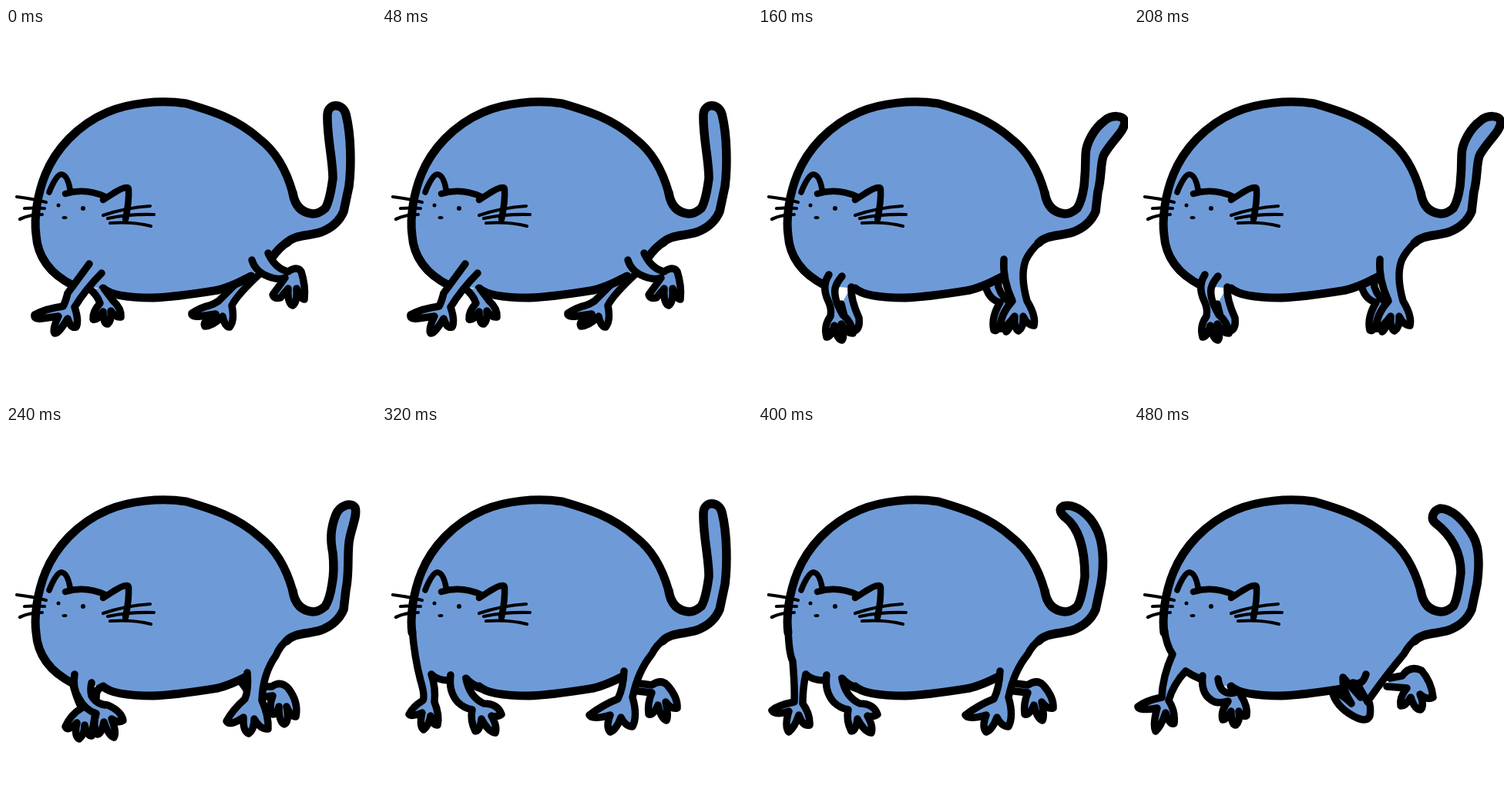
An HTML page for the animation above (560 ms loop, 480 by 480 pixels).

```html
<!DOCTYPE html>
<html lang="en">
<head>
<meta charset="utf-8">
<title>Walking round cat</title>
<style>
  html, body { margin: 0; width: 100%; height: 100%; overflow: hidden; background: #fff; }
  svg { display: block; width: 100vw; height: 100vh; }
</style>
</head>
<body>
<svg id="stage" viewBox="0 0 480 480" fill="none" stroke="#000" stroke-linecap="round" stroke-linejoin="round">
  <g id="behind" fill="#6e9bd8" stroke-width="9.5"></g>
  <path id="bodyFill" fill="#6e9bd8" stroke="none"/>
  <path id="bodyLine" stroke-width="11"/>
  <path id="tail" fill="#6e9bd8" stroke-width="11.5"/>
  <g id="front" fill="#6e9bd8" stroke-width="9.5"></g>
  <g id="face">
    <path stroke-width="7.5" d="M56,213Q66,188 73,190Q80,192 83,209"/>
    <path stroke-width="8.5" d="M77,215Q103,207 129,219M126,223L140,214Q158,203 159,209Q160,225 155,248"/>
    <path stroke-width="4.2" d="M14,219Q32,221 52,226M24,234Q38,233 50,234M18,248Q30,242 47,242
      M126,243Q155,233 187,231M132,247Q160,241 192,242M135,253Q165,251 188,257"/>
    <g fill="#000" stroke="none">
      <circle cx="68" cy="230" r="2.5"/>
      <circle cx="100" cy="234" r="3"/>
      <ellipse cx="76" cy="246" rx="3.5" ry="2.1"/>
    </g>
  </g>
</svg>
<script>
const FRAME_MS = 80;
const byId = id => document.getElementById(id);

// Body pieces that never move
const back = 'M372,214C362,178 346,157 329,144C299,117 265,107 234,98C200,93 160,97 132,109C92,126 64,158 51,190C41,215 36,245 39,268';
const chest = 'C41,298 59,320 87,334';
const bellyCurve = 'C136,347 160,350 190,350C220,349 250,344 275,340C295,335 306,328 318,322';
const belly = 'M126,338' + bellyCurve;
const rump = 'M366,277Q355,284 345,298';
const bellyStart = 'M109,328Q116,336 128,340';

// Tail tips, between the fixed outer and inner base
const tails = {
  up: 'L445,205C448,180 448,140 441,112C437,97 418,97 417,112C416,140 424,170 424,195',
  right: 'L441,212C446,195 443,172 448,150C453,135 460,125 460,113C457,101 444,106 438,114C428,125 425,145 425,160C426,180 424,195 423,205',
  farRight: 'L441,212C446,195 444,172 449,164C460,145 475,135 476,122C474,112 458,113 450,120C436,130 425,150 425,165C425,185 424,195 423,205',
  tilted: 'L441,212C446,190 442,160 446,145C449,130 456,115 453,106C448,98 433,103 428,115C420,135 421,150 424,165C426,185 425,195 423,205',
  left: 'L445,205C450,175 447,150 440,135C430,113 410,100 396,104C389,108 393,114 399,119C416,132 424,160 424,195',
  farLeft: 'L445,205C449,175 447,155 440,143C428,122 412,107 397,107C387,110 385,120 390,125C408,139 424,160 424,190'
};
const tailPath = tip => `M364,279C374,268 392,270 408,265Q430,257 438,238${tip}Q420,225 414,234Q406,241 398,241Q376,239 372,214`;

// Legs shared by the planted poses
const plantedFront = 'M89,323Q86,344 98,358Q106,366 117,368Q114,382 121,396Q127,396 129,380Q138,397 147,398Q150,390 142,376Q150,378 155,374Q150,360 132,360Q114,352 109,328';
const plantedHind = 'M314,318Q313,340 306,354Q286,362 269,375Q272,382 296,375Q290,390 296,397Q304,394 310,378Q316,390 325,390Q332,376 325,352Q332,318 350,296Q356,284 366,277';
const plantedFarHind = 'M332,344L350,346Q344,360 346,374Q352,376 358,362Q362,380 369,382Q372,376 368,358Q376,368 383,366Q384,352 370,336Q362,328 350,336L334,334';

const poses = [
  {
    tail: tails.up, edge: chest + rump,
    behind: ['M304,326L276,354Q270,358 264,360Q254,362 241,370Q240,375 252,374L272,371Q254,381 258,387Q268,387 281,374Q284,388 290,388Q297,380 293,360Q300,346 328,320'],
    front: [
      'M108,338Q118,346 122,357Q112,368 113,378Q118,380 126,368Q126,384 132,384Q137,380 136,367Q142,376 149,375Q150,364 139,354L127,338',
      'M108,306L80,344Q77,356 74,361Q52,364 37,372Q36,378 46,377L68,374Q60,390 63,396Q68,397 80,377Q84,390 91,388Q95,380 89,362Q104,338 124,318',
      'M319,301Q324,318 345,324Q355,327 362,324Q352,338 346,346Q348,352 356,350L366,338Q365,358 372,360Q378,356 377,338Q382,352 387,352Q389,335 383,316Q378,308 366,316Q349,312 340,292'
    ]
  },
  {
    tail: tails.right, edge: chest + rump,
    behind: ['M304,326Q296,345 295,356Q278,364 266,376Q267,384 286,378Q284,394 290,396Q298,390 300,377Q308,390 318,390Q321,382 309,358Q311,342 328,318'],
    front: [
      'M102,344L118,358Q106,368 107,377Q113,381 121,368Q120,381 126,380Q132,376 132,366Q138,377 145,374Q147,362 140,351Q134,346 130,350Q123,344 124,336',
      'M104,309Q78,332 84,358Q66,372 58,388Q61,395 74,382Q73,398 79,400Q86,396 85,380Q93,396 100,394Q103,380 97,361Q95,344 118,321',
      'M320,302Q330,324 350,334Q338,346 335,364Q340,369 353,352Q354,368 363,370Q367,366 365,352Q372,367 379,368Q381,345 372,326Q346,315 340,291'
    ]
  },
  {
    tail: tails.farRight, edge: chest,
    behind: ['M294,330Q298,352 314,356Q302,376 306,392Q311,395 317,378L322,394Q328,392 332,360Q316,350 312,336Q310,328 318,322'],
    front: [
      'M108,358L112,374L122,394Q133,392 131,376Q120,352 121,336',
      'M92,320Q82,335 91,354Q96,364 94,374Q85,386 89,401Q95,401 99,386Q102,404 109,405Q113,400 108,384Q116,397 123,396Q122,382 110,372Q98,352 100,338Q102,330 109,322',
      'M319,300Q317,326 330,354Q314,372 314,390Q320,391 333,374Q332,390 338,393Q345,388 344,374Q350,386 358,386Q361,374 349,354Q340,322 347,302Q352,290 366,277'
    ]
  },
  {
    tail: tails.tilted, edge: chest,
    behind: [
      'M302,328L312,342',
      'M332,352L346,350Q340,366 346,374Q352,374 354,364Q354,384 361,387Q368,384 364,364Q370,378 376,377Q380,358 366,340Q356,330 345,338L334,338'
    ],
    front: [
      'M126,338Q116,340 117,354',
      'M86,332Q91,352 98,366Q84,374 77,390Q80,397 92,385Q88,402 95,406Q102,400 102,388Q105,402 111,402L116,372',
      'M89,322Q86,340 94,352Q102,368 117,373Q112,388 118,400Q124,400 127,384Q133,402 140,404Q144,398 137,380Q146,386 152,382Q150,370 132,362Q118,362 111,350Q109,342 111,333',
      'M313,320Q315,342 310,354Q294,368 286,383Q290,390 308,378Q307,396 315,399Q322,394 322,380Q330,394 340,393Q341,376 332,356Q333,322 350,298Q356,284 366,277'
    ]
  },
  {
    tail: tails.up, edge: bellyStart,
    behind: [plantedFarHind],
    front: [
      'M39,262Q42,300 50,330Q56,350 53,356Q40,364 35,374Q38,378 52,372Q48,390 54,394Q61,388 63,376Q66,388 72,388Q75,375 68,358Q70,340 64,322Q72,330 86,330',
      plantedFront, plantedHind
    ]
  },
  {
    tail: tails.left, edge: bellyStart,
    behind: [plantedFarHind],
    front: [
      'M39,262Q40,295 45,305Q48,340 47,358Q26,362 18,369Q22,376 40,370Q34,390 40,397Q48,390 53,375Q58,390 67,388Q68,374 58,360Q58,340 62,322Q70,330 86,330',
      plantedFront, plantedHind
    ]
  },
  {
    tail: tails.farLeft, edge: '',
    behind: ['M328,338L354,340Q344,352 346,363Q352,364 359,352Q364,368 372,368Q377,362 371,348Q380,356 388,352Q386,332 373,317Q358,310 348,324L332,327'],
    front: [
      'M39,262Q42,285 50,296Q37,325 36,352Q16,356 5,364Q6,370 30,366Q24,388 28,396Q35,390 41,372Q46,388 52,386Q54,370 45,356Q51,335 67,318Q76,324 86,328',
      'M89,324Q86,350 105,358Q114,360 122,357Q112,370 115,381Q120,382 126,370Q126,388 132,388Q138,383 136,370Q140,378 146,376Q148,364 139,350Q136,342 130,346Q112,350 109,328',
      'M301,322Q296,338 284,333L294,352L271,326Q270,342 282,360Q268,346 257,344Q262,364 284,376Q302,386 306,376Q308,364 304,356Q328,322 350,296Q358,282 366,277',
      'M291,337L303,358'
    ]
  }
];

const toPaths = list => list.map(d => `<path d="${d}"/>`).join('');

function drawPose({ tail, edge, behind, front }) {
  byId('behind').innerHTML = toPaths(behind);
  byId('front').innerHTML = toPaths(front);
  byId('tail').setAttribute('d', tailPath(tail));
  byId('bodyLine').setAttribute('d', back + edge + belly);
}

byId('bodyFill').setAttribute('d', back + chest + 'L126,338' + bellyCurve + 'L366,277Z');

let shown = -1;
const start = performance.now();
function tick() {
  const elapsed = performance.now() - start;
  const index = Math.floor(elapsed / FRAME_MS) % poses.length;
  if (index !== shown) drawPose(poses[shown = index]);
  requestAnimationFrame(tick);
}
tick();
</script>
</body>
</html>
```
